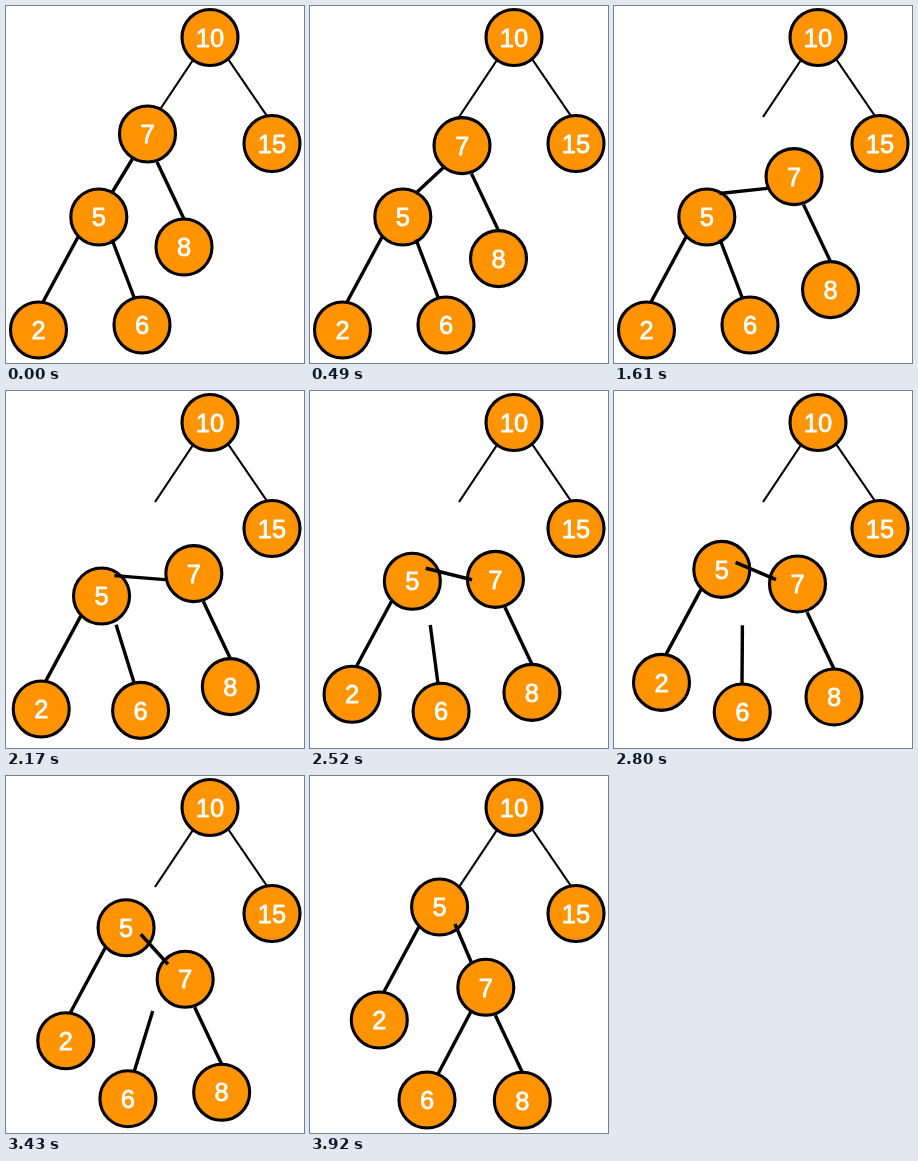
These frames come from a looping animation (298 px wide and 357 px high, 4060 ms). An HTML page with a canvas:

```html
<!DOCTYPE html>
<html lang="en">
<head>
<meta charset="utf-8">
<title>Tree rotation</title>
<style>
  html, body { margin: 0; width: 100%; height: 100%; overflow: hidden; background: #fff; }
  canvas { display: block; }
</style>
</head>
<body>
<canvas id="stage" width="298" height="357"></canvas>
<script>
const ctx = document.getElementById('stage').getContext('2d');
const TICK = 70, STEPS = 27, LOOP = 4060, RADIUS = 28;

// A mover returns a point's place: its start plus the share of each move done.
const mover = (dx1, dy1, dx2, dy2) => (x, y) => (p, q) =>
  [x + dx1 * p + dx2 * q, y + dy1 * p + dy2 * q];

const rest = mover(0, 0, 0, 0);
const lower = mover(47.3, 52.3, -13, 31);   // 7 and 8 sink to the right
const raise = mover(0, 0, 36.8, -80);       // 5 and 2 rise afterwards
const hand = mover(0, 0, -19, 5);           // 6 passes from 5 to 7

const nodes = [
  ['10', rest(204, 31.5)],
  ['15', rest(266, 137.5)],
  ['5', raise(92.8, 211)],
  ['2', raise(32.5, 324)],
  ['6', hand(136, 319)],
  ['8', lower(178, 241)],
  ['7', lower(141.5, 128)]
];

const backEdges = [
  [rest(187, 54), rest(149, 111)],
  [rest(222, 53), rest(261, 110)]
];

const frontEdges = [
  [lower(151, 156), lower(178, 213)],
  [raise(72, 231), raise(37, 296)],
  [mover(35, 37, 0, -1)(127, 152), mover(0, 0, 39.5, -39.5)(105.5, 187.5)],
  [mover(0, 0, 55, 2)(106, 233.5), mover(0, 0, 0, 7)(128, 291)]
];

const share = ticks => Math.max(0, Math.min(1, ticks / STEPS));

function drawEdges(edges, width, p, q) {
  ctx.strokeStyle = '#000';
  ctx.lineWidth = width;
  for (const [from, to] of edges) {
    ctx.beginPath();
    ctx.moveTo(...from(p, q));
    ctx.lineTo(...to(p, q));
    ctx.stroke();
  }
}

function drawNode(label, [x, y]) {
  ctx.beginPath();
  ctx.arc(x, y, RADIUS, 0, Math.PI * 2);
  ctx.fillStyle = '#ff9300';
  ctx.fill();
  ctx.lineWidth = 3.1;
  ctx.strokeStyle = '#000';
  ctx.stroke();
  ctx.fillStyle = ctx.strokeStyle = '#fff';
  ctx.lineWidth = 0.8;
  ctx.fillText(label, x, y + 9.2);
  ctx.strokeText(label, x, y + 9.2);
}

function draw(time) {
  const tick = Math.floor((time % LOOP) / TICK + 1e-6);
  const p = share(tick - 1);
  const q = share(tick - 2 - STEPS);

  ctx.fillStyle = '#fff';
  ctx.fillRect(0, 0, 298, 357);
  ctx.font = '25.5px "Liberation Sans", Arial, sans-serif';
  ctx.textAlign = 'center';
  drawEdges(backEdges, 2.2, p, q);
  for (const [label, place] of nodes) drawNode(label, place(p, q));
  drawEdges(frontEdges, 3.4, p, q);
}

function loop(now) {
  draw(now);
  requestAnimationFrame(loop);
}
draw(0);
requestAnimationFrame(loop);
</script>
</body>
</html>
```
